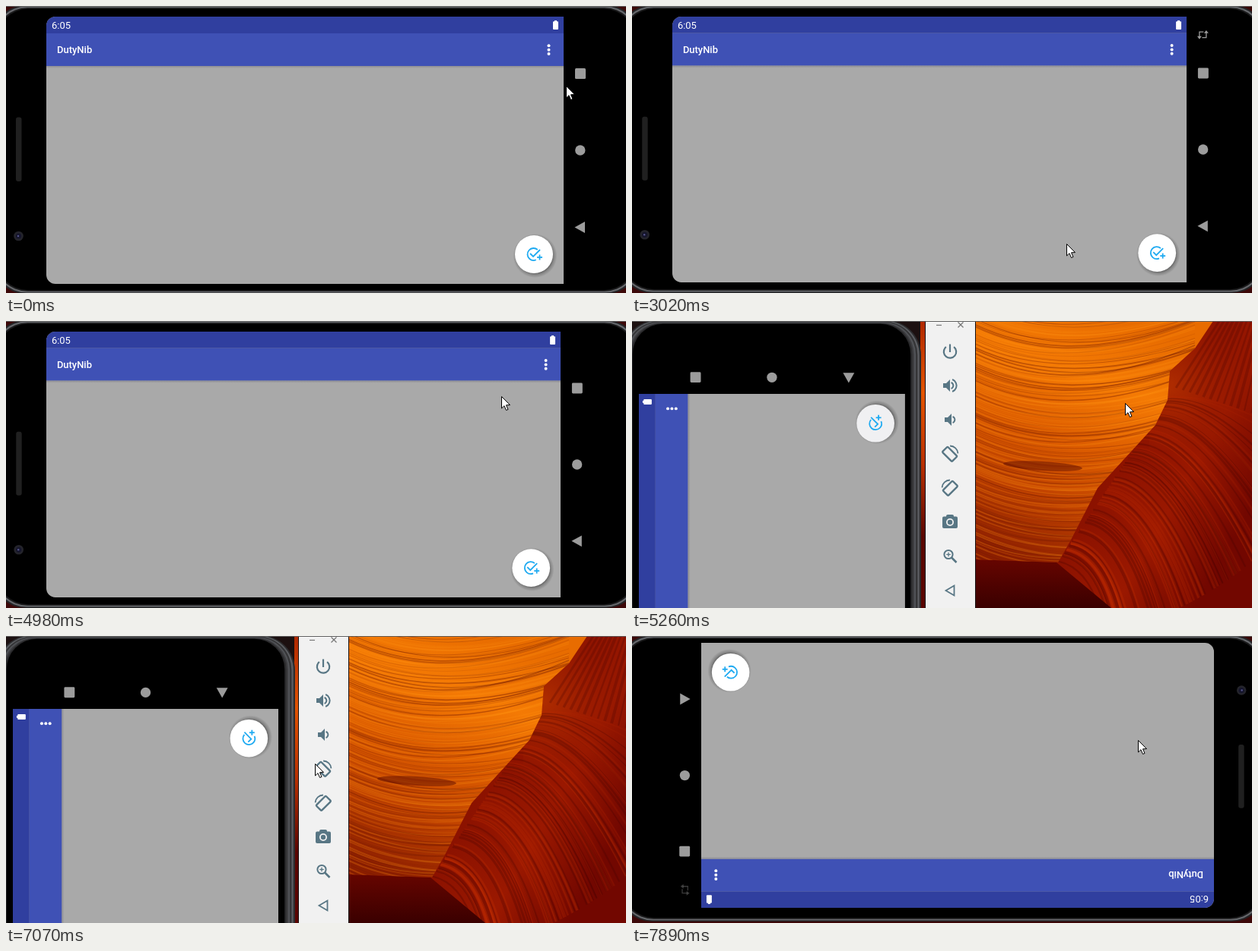
An HTML page with a canvas for the animation above (8000 ms loop, 815 by 378 pixels).

```html
<!DOCTYPE html>
<html lang="en">
<head>
<meta charset="utf-8">
<title>DutyNib rotation</title>
<style>
html, body { margin: 0; width: 100%; height: 100%; overflow: hidden; background: #000; }
canvas { display: block; width: 815px; height: 378px; }
</style>
</head>
<body>
<canvas id="stage" width="815" height="378"></canvas>
<script>
const W = 815, H = 378, LOOP = 8000, STEP = 140;
const SLATE = '#587684', GREY = '#9c9c9c', PANEL = '#f1f1f1', BLUE = '#1eaaf1';
let c = document.getElementById('stage').getContext('2d');

// Each move begins where the last one ended; loop is the radius of a circling detour
const moves = [
  { from: 10, to: 1260, x: 775, y: 156, loop: 90 },
  { from: 1260, to: 2085, x: 794, y: 210, loop: 88 },
  { from: 2085, to: 2220, x: 764, y: 358 },
  { from: 3010, to: 3020, x: 571, y: 313 },
  { from: 3020, to: 3960, x: 774, y: 60 },
  { from: 4120, to: 4980, x: 651, y: 99 },
  { from: 4980, to: 5260, x: 648, y: 108 },
  { from: 5260, to: 6230, x: 300, y: 180 },
  { from: 6230, to: 7070, x: 406, y: 168 },
  { from: 7200, to: 7890, x: 665, y: 137 }
];

const mix = (a, b, k) => a + (b - a) * k;

function mouseAt(t) {
  let x = 736, y = 105;
  for (const m of moves) {
    if (t < m.from) break;
    const n = t < 4980 || t >= 5260 ? Math.max(1, Math.round((m.to - m.from) / STEP)) : 1;
    const k = Math.min(1, Math.floor((t - m.from) / (m.to - m.from) * n + 1e-6) / n);
    const a = 2 * Math.PI * k - 1, r = m.loop || 0;
    x = mix(x, m.x, k) + r * (Math.cos(a) - Math.cos(-1));
    y = mix(y, m.y, k) + r * 1.15 * (Math.sin(a) - Math.sin(-1));
  }
  return [Math.round(x), Math.round(y)];
}

function rect(x, y, w, h, color) {
  c.fillStyle = color;
  c.fillRect(x, y, w, h);
}

function round(x, y, w, h, r, color) {
  c.beginPath();
  c.roundRect(x, y, w, h, r);
  c.fillStyle = color;
  c.fill();
}

function disc(x, y, r, color) {
  c.beginPath();
  c.arc(x, y, r, 0, 7);
  c.fillStyle = color;
  c.fill();
}

function trace(pts, close) {
  c.beginPath();
  for (let i = 0; i < pts.length; i += 2) c.lineTo(pts[i], pts[i + 1]);
  if (close) c.closePath();
}

function poly(pts, color) {
  trace(pts, true);
  c.fillStyle = color;
  c.fill();
}

function stroke(color, w) {
  c.strokeStyle = color;
  c.lineWidth = w;
  c.stroke();
}

function line(pts, color, w) {
  trace(pts);
  stroke(color, w);
}

function arc(x, y, r, a, b, color, w, back) {
  c.beginPath();
  c.arc(x, y, r, a, b, back);
  stroke(color, w);
}

function plus(x, y, r, color, w) {
  line([x - r, y, x + r, y], color, w);
  line([x, y - r, x, y + r], color, w);
}

function shade(g, ...colors) {
  colors.forEach((col, i) => g.addColorStop(i / (colors.length - 1), col));
  return g;
}

const blend = (x, y, u, v, ...colors) => shade(c.createLinearGradient(x, y, u, v), ...colors);
const glow = (x, y, a, b, ...colors) => shade(c.createRadialGradient(x, y, a, x, y, b), ...colors);

function turnHint(turn, alpha) {
  c.save();
  c.translate(754.5, 38);
  c.rotate(turn);
  c.globalAlpha = alpha;
  for (let i = 0; i < 2; i++) {
    line([1, -3.7, -4.5, -3.7, -4.5, 3], GREY, 1.3);
    poly([-7.5, 2, -1.5, 2, -4.5, 6], GREY);
    c.rotate(Math.PI);
  }
  c.restore();
}

function floatButton(x, y, color) {
  disc(x + 1.5, y + 2, 29, glow(x + 1.5, y + 2, 21, 29, '#0008', '#0003', '#0000'));
  disc(x, y, 25, color);
  arc(x - .5, y, 8, -.85, 1.15, BLUE, 1.8, true);
  line([x - 5, y - 1, x - 1, y + 3, x + 8, y - 6], BLUE, 1.8);
  plus(x + 7.5, y + 4, 3.5, BLUE, 1.8);
}

// Phone contents in landscape coordinates
function phone(buttonColor) {
  round(13, 146.5, 7.5, 84.5, 3, '#202020');
  disc(16.5, 303, 6.3, '#24242b');
  disc(16.5, 303, 3.6, '#15152c');
  disc(16, 303, 1.2, '#56568c');

  round(53, 14, 680, 352, [12, 0, 0, 12], '#a9a9a9');
  round(53, 14, 680, 22, [12, 0, 0, 0], '#303f9f');
  rect(53, 36, 680, 43, '#3f51b5');
  rect(53, 79, 680, 3, blend(0, 79, 0, 82, '#8d8d92', '#a9a9a9'));

  c.fillStyle = '#fff';
  c.font = '13px Roboto, sans-serif';
  c.fillText('6:05', 60, 30);
  c.font = '500 13px Roboto, sans-serif';
  c.fillText('DutyNib', 67, 62);
  round(719, 20.3, 7, 10.7, 1, '#fff');
  rect(721, 19, 3, 2, '#fff');
  for (let i = -1; i < 2; i++) disc(713.5, 57.7 + i * 5.4, 2, '#fff');

  round(748, 82, 14, 14, 1.5, GREY);
  disc(754.8, 190, 6.7, GREY);
  poly([747.5, 291.5, 761, 284, 761, 299], GREY);
  floatButton(694, 327, buttonColor);
}

// Nested outlines, each inset by dx and dy from the one before
function shell(x, y, w, h, r, dx, dy, colors) {
  colors.forEach((col, i) =>
    round(x + i * dx, y + i * dy, w - 2 * i * dx, h - 2 * i * dy, r - i, col));
}

function frameWide(bottom) {
  rect(0, 0, W, H, '#3c0808');
  shell(-18, -1, 851, bottom + 1, 44, 2, 1.6, ['#242426', '#66686c', '#1a1a1b', '#000']);
}

function wide(scale, bottom) {
  frameWide(bottom);
  c.translate(53, 14);
  c.scale(scale, scale);
  c.translate(-53, -14);
}

let seed = 7;
const random = () => (seed = seed * 16807 % 2147483647) / 2147483647;

function paintRock() {
  rect(450, 0, W - 450, H, blend(640, 180, 800, 270, '#8c1200', '#9a1800', '#720700'));
  rect(680, 0, 135, 170, glow(705, 85, 5, 130, '#c8400088', '#a0200066', '#80100000'));

  // fins spreading down from the ridge
  for (let i = 0; i < 90; i++) {
    const k = random();
    c.beginPath();
    c.moveTo(mix(706, 560, k), mix(100, 318, k));
    c.quadraticCurveTo(mix(775, 610, k), mix(95, 330, k), mix(880, 620, k), mix(150, 420, k ** .35));
    stroke(random() < .5 ? 'rgba(70,0,0,.28)' : `rgba(190,45,0,${.12 + .25 * k})`, 1 + random() * 3);
  }
  for (let i = 0; i < 14; i++)
    line([772 + i * 6, 0, 715 + i * 9, 88 + i * 3], 'rgba(70,0,0,.25)', 1 + random() * 3);
  poly([450, 314, 558, 318, 630, 378, 450, 378], blend(0, 315, 0, 378, '#650500', '#3a0000'));

  // layered face left of the ridge
  c.save();
  trace([450, 0, 764, 0, 740, 36, 707, 66, 704, 104, 688, 137, 612, 220, 576, 290, 560, 318, 450, 314], true);
  c.clip();
  rect(450, 0, 320, 320, blend(640, 0, 530, 318, '#e86c00', '#f47a04', '#dd5d00', '#c04200', '#8f2000'));
  for (let i = 0; i < 150; i++) {
    const y = mix(-60, 320, i / 150), dark = random() < .6;
    c.beginPath();
    c.moveTo(448, y);
    c.bezierCurveTo(510, y + 30, 600, y + 42 + random() * 12, 740, y - 12 + random() * 16);
    stroke(dark ? `rgba(110,22,0,${.12 + random() * .3})` : 'rgba(255,145,20,.24)', .6 + random() * 1.8);
  }
  c.beginPath();
  c.ellipse(540, 191, 52, 6, .06, 0, 7);
  c.fillStyle = 'rgba(95,10,0,.5)';
  c.fill();
  c.restore();
  rect(379, 0, 8, H, blend(0, 0, 0, H, '#b02800', '#e25400', '#b83000', '#5a0600', '#5a0400'));
}

function speaker(x, y, waves) {
  poly([x, y - 3, x + 4, y - 3, x + 9, y - 8, x + 9, y + 8, x + 4, y + 3, x, y + 3], SLATE);
  for (let i = 1; i <= waves; i++) arc(x + 9, y, i * 4.3, -1.2, 1.2, SLATE, 2);
}

function turnIcon(y, flip) {
  c.save();
  c.translate(0, y);
  c.scale(flip, 1);
  c.rotate(Math.PI / 4);
  c.beginPath();
  c.roundRect(-9, -4.5, 18, 10, 1.5);
  stroke(SLATE, 2.4);
  arc(0, 0, 10.5, -2.35, -.85, SLATE, 1.8);
  c.restore();
}

function toolbar(x) {
  rect(x - 1, 0, 67, H, '#151010');
  rect(x, 0, 65, H, PANEL);
  c.save();
  c.translate(x + 32, 0);
  line([-18, 5.5, -11, 5.5], '#777', 1.2);
  line([10.5, 1.5, 17.5, 8.5], '#777', 1.2);
  line([17.5, 1.5, 10.5, 8.5], '#777', 1.2);

  arc(0, 40.5, 8.2, -.9, Math.PI + .9, SLATE, 2.2);
  line([0, 30.5, 0, 41], SLATE, 2.2);
  speaker(-9, 85, 2);
  speaker(-7, 130, 1);
  turnIcon(175, 1);
  turnIcon(220, -1);

  round(-10, 257.5, 20, 15.5, 2, SLATE);
  round(-5, 255, 10, 5, 2, SLATE);
  disc(0, 265, 5, PANEL);
  disc(0, 265, 3.2, SLATE);

  arc(-2, 307.5, 5.6, 0, 7, SLATE, 2);
  line([2, 311.5, 8.5, 318], SLATE, 2.6);
  plus(-2, 307.5, 2.8, SLATE, 1.3);

  trace([-5.5, 355, 5.5, 348.5, 5.5, 361.5], true);
  stroke(SLATE, 1.8);
  c.restore();
}

const rock = document.createElement('canvas');
rock.width = W;
rock.height = H;
const main = c;
c = rock.getContext('2d');
paintRock();
c = main;

function tall(scale, x) {
  rect(0, 0, W, H, '#1c1010');
  c.drawImage(rock, 0, 0);
  shell(-13, -1, 393, 700, 46, 2.3, .8,
    ['#2c2c2e', '#5c5e62', '#343436', '#505256', '#3c3c3f', '#2a2a2c', '#000']);
  toolbar(x);
  c.translate(9, 96);
  c.scale(scale, scale);
  c.rotate(-Math.PI / 2);
  c.translate(-733, -14);
}

function cursor(x, y) {
  c.save();
  c.translate(x + .5, y + .5);
  trace([0, 0, 0, 15.5, 3.5, 12.2, 6, 18, 8.5, 17, 6, 11.3, 11, 11.1], true);
  c.fillStyle = '#fff';
  c.fill();
  stroke('#000', 1);
  c.restore();
}

const fade = age => Math.max(0, Math.min(1, 1 - (age - 450) / 300));

function draw(t) {
  c.save();
  if (t < 3020) {
    wide(1, 379);
    phone('#fff');
  } else if (t < 5260) {
    wide(676 / 680, 378);
    phone('#fff');
    turnHint(0, fade(t - 3020));
  } else if (t < 7200) {
    const settling = t < 5390;
    tall(settling ? .994 : .9915, settling ? 386 : 385);
    phone(settling ? '#f0f0f2' : '#fff');
  } else {
    frameWide(376);
    c.translate(765, 358);
    c.scale(-674 / 680, -674 / 680);
    c.translate(-53, -14);
    phone('#fff');
    turnHint(Math.PI / 2, fade(t - 7250));
  }
  c.restore();
  rect(0, 0, W, 1, '#626262');
  if (t < 2340 || t >= 3020) cursor(...mouseAt(t));
}

const begin = performance.now();
function tick() {
  draw((performance.now() - begin) % LOOP);
  requestAnimationFrame(tick);
}
tick();
</script>
</body>
</html>
```
